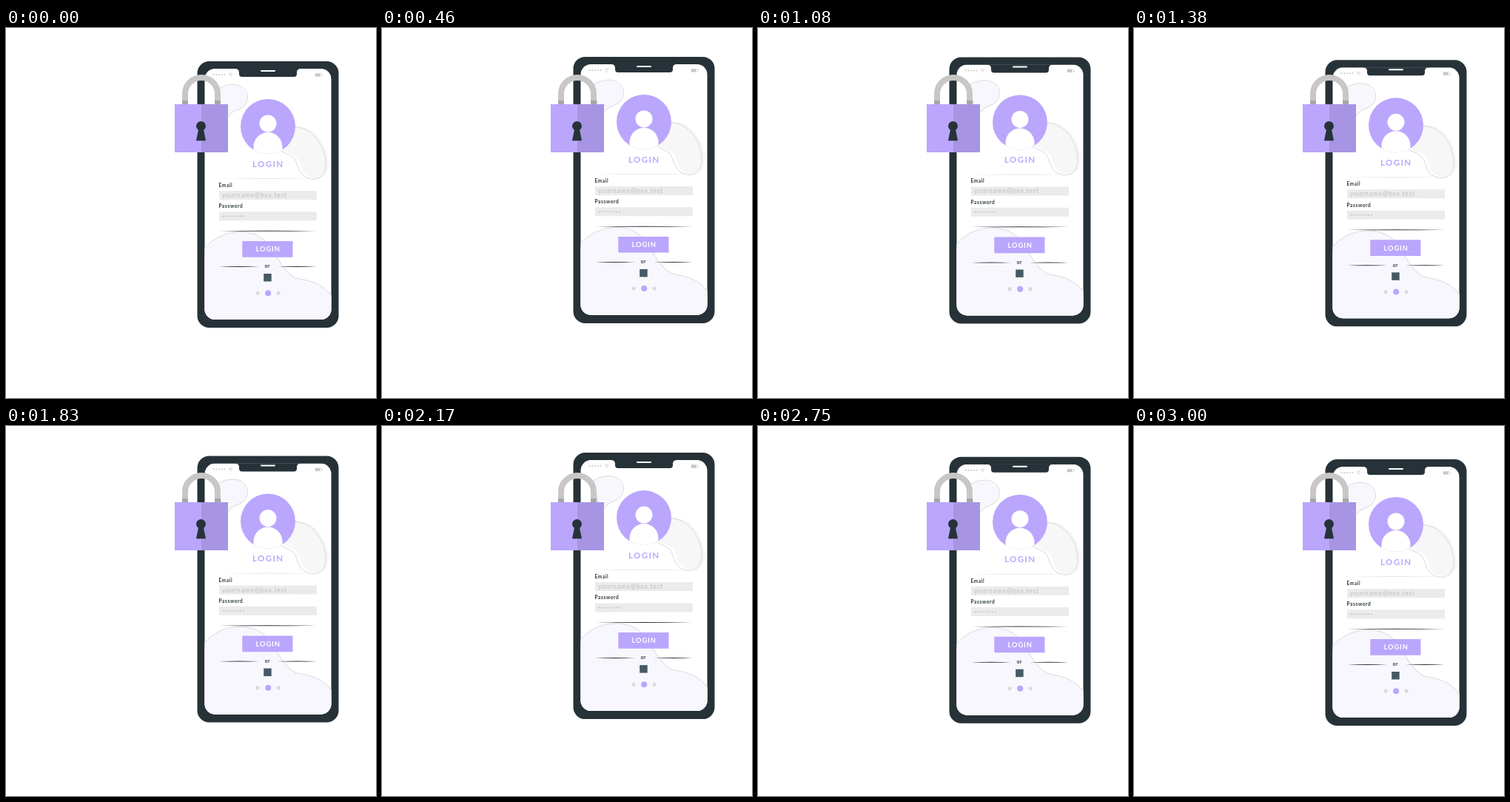
Animation, 500 px wide and 500 px high, one loop 3040 ms. Source, as an HTML page:

```html
<!DOCTYPE html>
<html lang="en">
<head>
<meta charset="utf-8">
<title>Secure login</title>
<style>
  html, body { margin: 0; width: 100%; height: 100%; overflow: hidden; background: #fff; }
  svg { display: block; width: 100vw; height: 100vh; }
  text { font-family: Lato, "Open Sans", sans-serif; font-weight: 700; }
  .purple { fill: #baa6fd; }
  .dark { fill: #263238; }
  .label { font-size: 6.5px; letter-spacing: .6px; }
  .field { fill: #ebebeb; }
  .gray { fill: #c7c7c7; }
  .outline { fill: none; stroke: #d8d8d8; }
  .dots { fill: none; stroke: #c4c4c4; stroke-width: 2; stroke-linecap: round; }
</style>
</head>
<body>
<svg viewBox="0 0 500 500">
  <defs>
    <clipPath id="screen"><rect x="268.5" y="55" width="171" height="339" rx="14"/></clipPath>
    <clipPath id="disc"><circle cx="354" cy="133" r="37"/></clipPath>
    <path id="wave" d="M250 325C262 305 276 276 318 275.5C365 278 358 317 391 338C408 341 428 344 440 363V410H250Z"/>
    <path id="bean" d="M388 134C412 132 432 158 432 184C432 202 420 207 408 203C392 197 396 182 388 175C382 170 376 169 370 165Z"/>
    <path id="drop" d="M286 83C293 78 300 76.5 308 76.5C320 77 327 86 326.500 95C325 108 312 111 307 113C302 117 302 121 294 123Z"/>
    <path id="taper" d="M0 0Q.5-1 1 0Q.5 1 0 0Z"/>
  </defs>

  <g id="phone">
    <rect class="dark" x="258.500" y="45" width="191" height="360" rx="16"/>
    <g clip-path="url(#screen)">
      <path fill="#fff" d="M268 55H440V395H268Z"/>
      <use href="#wave" x="4" y="3" fill="#f8f7fe"/>
      <use href="#wave" fill="#f8f7fe"/>
      <use href="#wave" class="outline"/>
      <use href="#bean" x="4" y="-1" fill="#f7f7f7"/>
      <use href="#bean" class="outline"/>
      <use href="#drop" x="-1" y="1" fill="#f8f7fe"/>
      <use href="#drop" class="outline"/>
      <path class="dark" d="M309 54V55Q315 55 315 60V62Q315 66 319 66H389Q393 66 393 62V60Q393 55 399 55V54Z"/>
    </g>
    <rect x="344" y="57" width="20" height="2" rx="1" fill="#fff"/>

    <path class="dots" d="M280.500 63h15" stroke-dasharray="0 3.7"/>
    <g fill="none" stroke="#c7c7c7" stroke-width=".8">
      <path d="M300.600 62.300q2.900-2.400 5.800 0M302 63.700q1.500-1.200 3 0"/>
      <rect x="417.900" y="61.400" width="8.600" height="4" rx=".6" stroke-width=".5"/>
    </g>
    <circle class="gray" cx="303.500" cy="65" r=".7"/>
    <path class="gray" d="M418 61.500h6.500v3.800h-6.500zM427 62.500h.8v1.800h-.8z"/>

    <circle class="purple" cx="354" cy="133" r="37"/>
    <g fill="#fff" clip-path="url(#disc)">
      <circle cx="354" cy="129" r="11.500"/>
      <path d="M334.500 172V160.500a19.500 19.500 0 0 1 39 0V172Z"/>
    </g>
    <text class="purple" x="333" y="187.800" font-size="11.500" letter-spacing="1.400">LOGIN</text>

    <use href="#taper" transform="translate(288 203.500) scale(132 1)" fill="#e6e6e6"/>
    <text class="dark label" x="287.600" y="215">Email</text>
    <path class="field" d="M288 220h132v12H288zM288 248.300h132v12H288z"/>
    <text x="292" y="229" fill="#bdbdbd" style="font-weight:400" font-size="8.500" letter-spacing=".8">yourname@box.test</text>
    <text class="dark label" x="287.600" y="243.300">Password</text>
    <path class="dots" d="M293.500 254.300h27.500" stroke-dasharray="0 3.900"/>

    <g class="dark">
      <use href="#taper" transform="translate(288 274.300) scale(132 1)"/>
      <use href="#taper" transform="translate(288 322.500) scale(54 1)"/>
      <use href="#taper" transform="translate(367 322.500) scale(53 1)"/>
    </g>
    <path class="purple" d="M319.300 288h68.200v21.700h-68.200z"/>
    <text x="337.500" y="302.200" fill="#fff" font-size="9.300" letter-spacing=".9">LOGIN</text>
    <text class="dark label" x="349.700" y="324.300">or</text>
    <path fill="#455a64" d="M348.200 332h10.500v10.500h-10.500z"/>
    <g fill="#dbdbdb">
      <circle cx="340" cy="358.200" r="2.600"/>
      <circle class="purple" cx="354.200" cy="358.200" r="4"/>
      <circle cx="368.200" cy="358.200" r="2.600"/>
    </g>
  </g>

  <g id="lock">
    <path d="M242 103V89a22 22 0 0 1 44 0V103" fill="none" stroke="#c7c7c7" stroke-width="8"/>
    <path fill="#a6a6a6" d="M238 98h8v5h-8zM282 98h8v5h-8z"/>
    <path class="purple" d="M228 103h72v65h-72z"/>
    <path fill="#a795e3" d="M264 103h36v65h-36z"/>
    <circle class="dark" cx="263.500" cy="132.500" r="6.500"/>
    <path class="dark" d="M260.500 135h6l3.500 17.300h-13z"/>
  </g>
</svg>
<script>
  const phone = document.getElementById("phone");
  const LOOP = 3040, FLOAT = 1500, RISE = 10, STEP = 1000 / 24;

  // The phone rises and sinks linearly, stepped at 24 frames a second.
  function draw(now) {
    const t = Math.floor((now % LOOP + 5) / STEP) * STEP;
    const phase = (t % FLOAT) / FLOAT;
    const lift = RISE * (1 - Math.abs(1 - 2 * phase));
    phone.setAttribute("transform", `translate(0 ${-lift.toFixed(3)})`);
  }

  const start = performance.now();
  function tick() {
    draw(performance.now() - start);
    requestAnimationFrame(tick);
  }
  tick();
</script>
</body>
</html>
```
